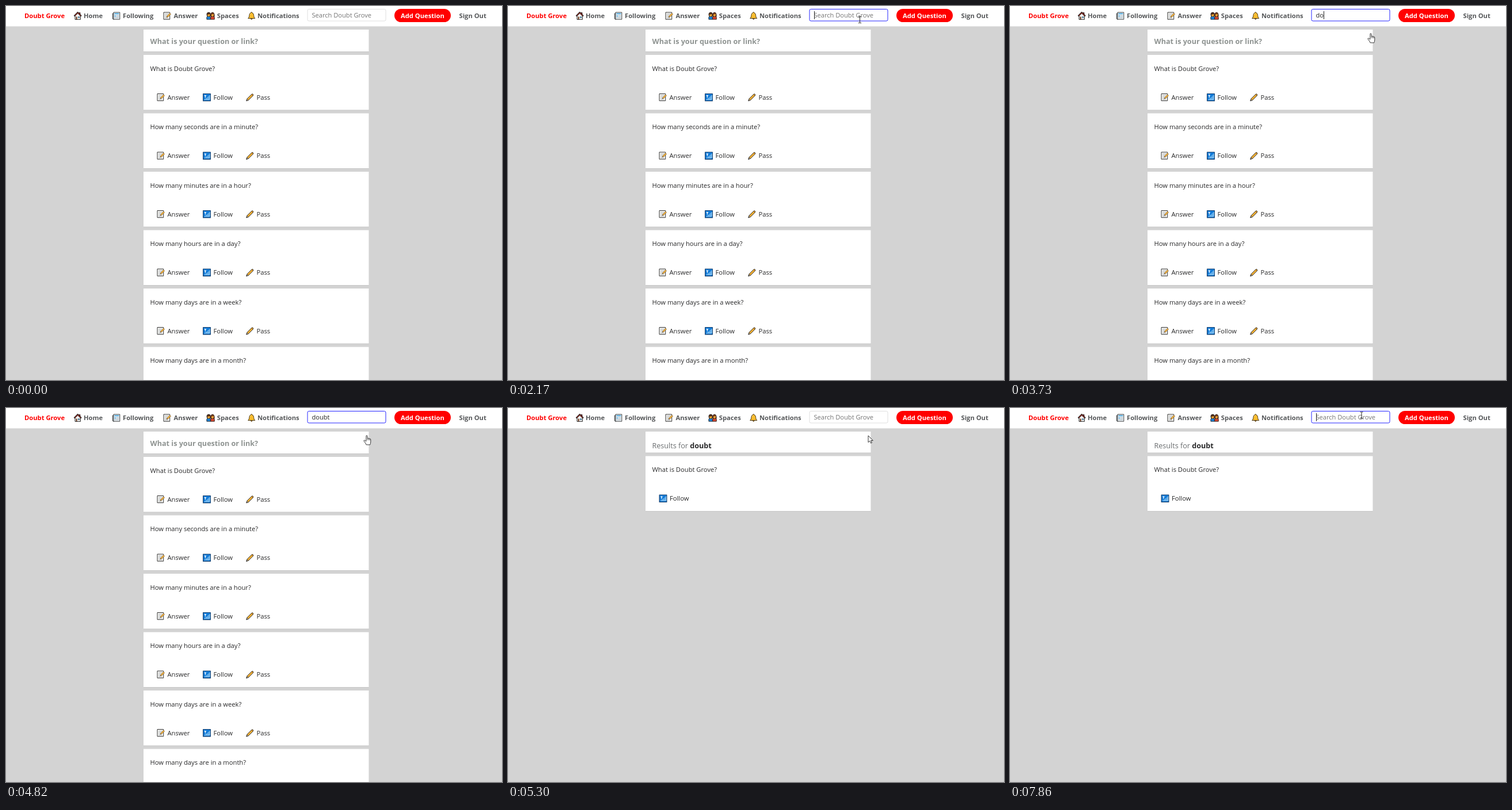
An HTML page with a canvas that plays this animation: 862 by 650 pixels, repeating every 8000 ms.

```html
<!DOCTYPE html>
<html lang="en">
<head>
<meta charset="utf-8">
<title>Questions</title>
<style>
  html, body { margin: 0; width: 100%; height: 100%; overflow: hidden; background: #d3d3d3; }
  canvas { display: block; }
</style>
</head>
<body>
<canvas id="stage" width="862" height="650"></canvas>
<script>
const ctx = document.getElementById('stage').getContext('2d');
const LOOP = 8000;
const SITE = 'Doubt Grove';
const TERM = 'doubt';
const INK = '#282829';
const FAMILY = '"Open Sans", "Noto Sans", sans-serif';
const QUESTIONS = [
  `What is ${SITE}?`,
  'How many seconds are in a minute?',
  'How many minutes are in a hour?',
  'How many hours are in a day?',
  'How many days are in a week?',
  'How many days are in a month?'
];

// Each icon is a list of [path, fill, stroke, line width] in a 14 px box.
const ICONS = {
  home: [
    ['M2 7V13.4H11.4V7L6.7 2.6Z', '#fff', '#222', 1],
    ['M9 1.5H11V5H9Z', '#b33', '#222', .7],
    ['M.6 7.6L6.7 1.3L12.8 7.6', null, '#1b1b1b', 2.5],
    ['M1.5 7L6.7 1.7L11.9 7', null, '#e23b2e', 1],
    ['M3.6 8.5H5.7V13H3.6Z', '#6b3a1d'],
    ['M7.4 8.5H9.8V10.8H7.4Z', '#55b9ef', '#222', .5]
  ],
  news: [
    ['M.8 3H3V13.2H1.8L.8 12Z', '#aebbc4', '#333', .9],
    ['M2.4 1H13.3V13.2H2.4Z', '#e7eef2', '#333', .9],
    ['M4 2.5H11.8V4.3H4Z', '#46a5dd'],
    ['M4 6H7.2V9H4Z', '#8fc5e6'],
    ['M8.2 6.5H11.8M8.2 8.5H11.8M4 10.5H11.8', null, '#a5b0b8', .8]
  ],
  memo: [
    ['M1 1H11.7V13.2H1Z', '#f8f8f5', '#333', 1],
    ['M3 3.5H9.8M3 5.5H8M3 7.5H7M3 9.5H6M3 11.3H9.5', null, '#a9adb0', .8],
    ['M6.2 9.8L7 7.3L11.8 2.5L13.5 4.2L8.7 9Z', '#f8b53c', '#6b5130', .7],
    ['M6.2 9.8L6.8 8.2L7.9 9.2Z', '#333']
  ],
  people: [
    ['M.6 13.2V9.5Q.8 7.8 3.8 7.8T7.3 10V13.2Z', '#1b82d8', '#222', .9],
    ['M7.3 13.2V10Q7.5 7.8 10.8 7.8T14 9.8V13.2Z', '#d9462f', '#222', .9],
    ['M.7 6Q0 1 4 1Q7.7 1 7.2 6L6.2 8H1.7Z', '#4c2a17', '#222', .6],
    ['M7.2 8.2Q6.8 1 10.6 1Q14.3 1 14 8.2Z', '#6b351a', '#222', .6],
    ['M2 4.5Q4.5 5 6 3.7V6.3Q5.5 8.3 4 8.3T2 6.3Z', '#f6a735'],
    ['M8.8 4.7Q11 4.5 12.5 3.8V6.3Q12 8.3 10.6 8.3T8.8 6.3Z', '#f6a735']
  ],
  bell: [
    ['M5.2 11.3Q5.4 13.6 6.7 13.6T8.2 11.3Z', '#e39419', '#333', .8],
    ['M.7 11.5Q2.8 9.7 2.8 6.5Q2.8 2.6 5.5 2Q5.5 .7 6.7 .7T7.9 2Q10.6 2.6 10.6 6.5Q10.6 9.7 12.7 11.5Z', '#fbbd2e', '#4b3a1a', 1],
    ['M4.5 5Q4.6 3.8 5.8 3.5', null, '#ffe28a', 1]
  ],
  signal: [
    ['M.6 1H13.4V13.4H.6Z', '#127bd8', '#17406e', 1.1],
    ['M2.4 3.5H6.4L4.9 5.7V8H3.9V5.7Z', '#fff'],
    ['M5.8 11V8.5M8 11V6.9M10.2 11V5.2M12 11V3.5M2.5 11H12', null, '#a9daf9', 1.1]
  ],
  pencil: [
    ['M.8 13.4L2 9.8L10 1.8Q11.2 .8 12.3 1.9T12.4 4.2L4.4 12.2Z', '#f9b233', '#2b2b2b', 1],
    ['M.8 13.4L2 10L4.2 12.2Z', '#f5dcb4', '#2b2b2b', .7],
    ['M9.8 2.3L12 4.5', null, '#8f5a2a', 1],
    ['M.6 13.6L1.4 11.7L2.5 12.8Z', '#222']
  ]
};

const POINTERS = {
  arrow: [['M.5 .5V12.2L3.2 9.7L5 13.6L6.9 12.8L5.2 9H8.8Z', '#fff', '#222', .9]],
  hand: [['M-1 .6Q.6 -.4 1.1 1.1V5Q2.3 4.4 3 5.4Q4.4 4.9 5 6Q6.7 5.8 6.8 7.3V11.5Q6.6 14.3 5.6 16.4H-.9Q-1.5 14-5 9.9Q-5.4 8.4-3.8 8.5L-1.2 10.5Z', '#fff', '#222', .9],
    ['M1.1 5V8.3M3.1 5.5V8.5M5.1 6V8.8', null, '#222', .7]],
  beam: [['M-2.5-5.5H-.7L0-5L.7-5.5H2.5M0-5V5M-2.5 5.5H-.7L0 5L.7 5.5H2.5', null, '#222', 1]]
};

// Pointer track: [time, x, y, shape]; stepped sections are sampled below.
const STEP = 78;
const TRACK = [
  [380, 843, 628, 'arrow'], [520, 806, 500, 'arrow'], [692, 732, 262, 'arrow'],
  [840, 675.5, 113.5, 'arrow'], [1004, 641, 48, 'arrow'], [1160, 623.5, 7, 'beam'],
  [1320, 619.5, 13, 'beam'], [1395, 614.5, 20, 'beam'], [1470, 611.5, 24, 'beam'],
  [2250, 612.5, 26, 'beam'], [2410, 619, 37, 'arrow'], [2487, 631, 57, 'arrow'],
  [2565, 629, 52, 'hand'], [2642, 627, 47.5, 'hand'],
  [5220, 625.5, 47.5, 'arrow'], [7310, 625, 44, 'arrow'], [7388, 621, 34, 'arrow'],
  [7466, 617, 23, 'beam'], [7544, 613, 13, 'beam'], [7622, 611.5, 9, 'beam'],
  [7700, 611, 12.5, 'beam']
];
const KEYS = [3500, 3730, 3970, 4050, 4280];

function shape(parts, x, y) {
  ctx.save();
  ctx.translate(x, y);
  ctx.lineJoin = 'round';
  for (const [d, fill, stroke, width] of parts) {
    const path = new Path2D(d);
    if (fill) { ctx.fillStyle = fill; ctx.fill(path); }
    if (stroke) { ctx.strokeStyle = stroke; ctx.lineWidth = width; ctx.stroke(path); }
  }
  ctx.restore();
}

function rect(x, y, w, h, color) {
  ctx.fillStyle = color;
  ctx.fillRect(x, y, w, h);
}

function font(size, bold) {
  ctx.font = `${bold ? 'bold ' : ''}${size}px ${FAMILY}`;
}

function text(str, x, y, color = INK, size = 11.2, bold = false) {
  font(size, bold);
  ctx.fillStyle = color;
  ctx.fillText(str, x, y);
}

function card(y, h) {
  rect(239, y, 391.5, h + .5, '#c7c7c7');
  rect(239, y, 391.5, h - .5, '#fff');
}

function action(icon, label, x, y) {
  shape(ICONS[icon], x, y - 11);
  text(label, x + 18.5, y);
}

function question(str, y, actions) {
  card(y, 96);
  text(str, 250.5, y + 27.5);
  for (const [icon, label, x] of actions) action(icon, label, x, y + 77.5);
}

function box(x, y, w, h, r, fill, stroke) {
  ctx.beginPath();
  ctx.roundRect(x, y, w, h, r);
  ctx.fillStyle = fill;
  ctx.fill();
  if (stroke) { ctx.strokeStyle = stroke; ctx.lineWidth = 1; ctx.stroke(); }
}

function nav() {
  rect(0, 0, 862, 36, '#c9c9c9');
  rect(0, 0, 862, 35.5, '#fff');
  text(SITE, 32, 21, '#f00', 11.2, true);
  const links = [
    ['home', 'Home', 118], ['news', 'Following', 184.5], ['memo', 'Answer', 273],
    ['people', 'Spaces', 348.3], ['bell', 'Notifications', 420]
  ];
  for (const [icon, label, x] of links) {
    shape(ICONS[icon], x, 10);
    text(label, x + (icon === 'home' || icon === 'bell' ? 17 : 18.5), 21, '#555759', 11.2, true);
  }
  box(675, 5, 98, 23, 11.5, '#f00');
  text('Add Question', 686, 21, '#fff', 11.2, true);
  text('Sign Out', 787.5, 21, '#555759', 11.2, true);
}

function search(t) {
  const focused = (t >= 2170 && t < 5220) || t >= 7780;
  const typed = t < 5220 ? TERM.slice(0, KEYS.filter(k => t >= k).length) : '';
  const caret = focused && !(t >= 2720 && t < 3180) && !(t >= 4820 && t < 5220);
  box(524, 5.5, 136, 20.5, 2.5, '#fff', focused ? '#2424ff' : '#dedede');
  text(typed || `Search ${SITE}`, 531.5, 20, typed ? INK : '#757575', 11.1);
  if (caret) rect(Math.round(531.8 + (typed ? ctx.measureText(typed).width : 0)), 9, 1, 14, '#222');
}

function feed() {
  const actions = [['memo', 'Answer', 262], ['signal', 'Follow', 342], ['pencil', 'Pass', 417]];
  card(41, 38.5);
  text('What is your question or link?', 250.5, 65.5, '#8e9391', 12.6, true);
  QUESTIONS.forEach((q, i) => question(q, 85 + i * 101.5, actions));
}

function results(t) {
  card(41, 37);
  const lead = 'Results for ';
  text(lead, 250.5, 70, '#6b6e70', 12.6);
  const w = ctx.measureText(lead).width;
  text(TERM, 250.5 + w, 70, INK, 12.6, true);
  if (t >= 5300) question(QUESTIONS[0], 83.5, [['signal', 'Follow', 262.5]]);
}

function pointer(t) {
  if (t < 380) return;
  if (t < 1160) t = 380 + Math.floor((t - 380) / STEP) * STEP;
  const i = TRACK.findLastIndex(p => t >= p[0]);
  let [start, x, y, kind] = TRACK[i];
  if (t < 1160) {
    const [end, x2, y2] = TRACK[i + 1];
    const f = (t - start) / (end - start);
    x += (x2 - x) * f;
    y += (y2 - y) * f;
  }
  shape(POINTERS[kind], x, y);
}

function draw(now) {
  const t = now % LOOP;
  rect(0, 0, 862, 650, '#d3d3d3');
  t < 5220 ? feed() : results(t);
  nav();
  search(t);
  pointer(t);
}

const begin = performance.now();
function tick() {
  draw(performance.now() - begin);
  requestAnimationFrame(tick);
}
tick();
</script>
</body>
</html>
```
